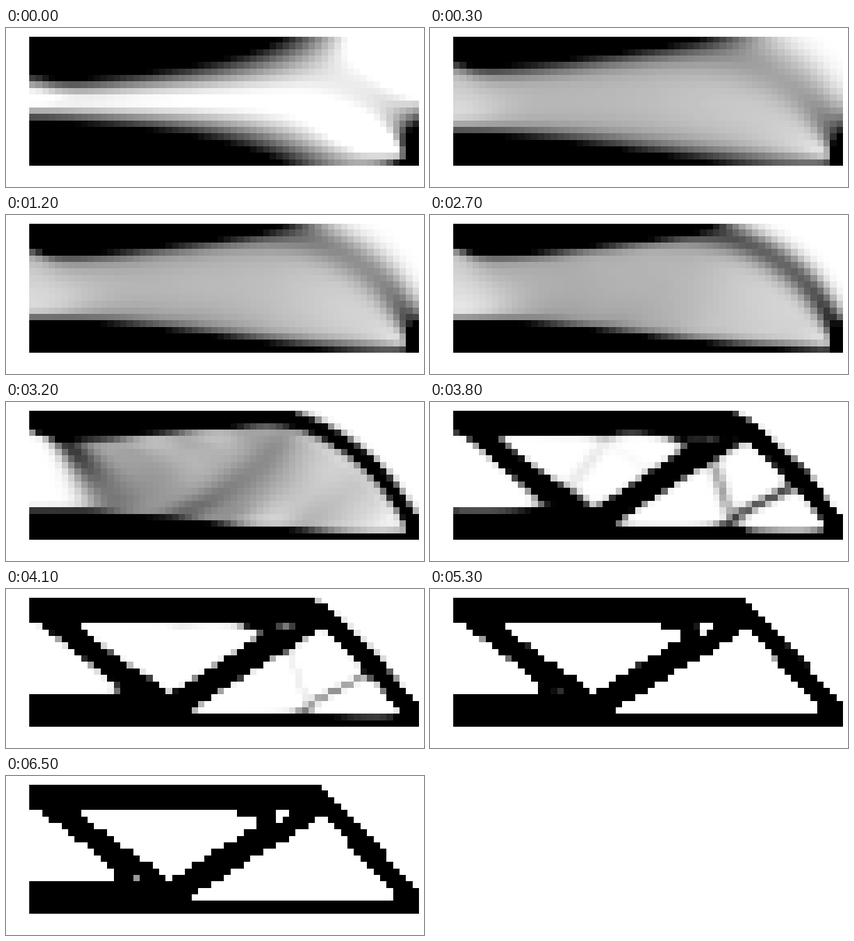
These frames come from a looping animation (666 by 254 pixels, 10000 ms). A matplotlib script:

```python
import numpy as np
import matplotlib.pyplot as plt
from matplotlib.animation import FuncAnimation

W, H, DPI = 666, 254, 100
FRAMES, STEP = 100, 100
NX, NY = 60, 20
CELL, LEFT, RIGHT, TOP, BOTTOM = 10.35, 37, 658, 13, 220
VOLUME, VOID, MOVE, ETA, RADIUS = 0.5, 1e-3, 0.2, 0.5, 1.5
P_HOLD, P_STEP, P_MAX = 25, 0.2, 3  # stiffness penalty
Q_HOLD, Q_STEP, Q_MAX = 24, 0.05, 5  # grey-scale filter
SETTLED = 65
COL = 2 * (NY + 1)  # degrees of freedom in one column of nodes


def element_stiffness(nu=1 / 3):
    """Plane-stress bilinear square, by 2x2 Gauss integration."""
    law = np.array([[1, nu, 0], [nu, 1, 0], [0, 0, (1 - nu) / 2]]) / (1 - nu ** 2)
    sx, sy = np.array([-1, 1, 1, -1]), np.array([-1, -1, 1, 1])
    ke = np.zeros((8, 8))
    for a in (-1, 1):
        for b in (-1, 1):
            dx = sx * (1 + sy * b / 3 ** 0.5) / 2
            dy = sy * (1 + sx * a / 3 ** 0.5) / 2
            strain = np.zeros((3, 8))
            strain[0, ::2] = strain[2, 1::2] = dx
            strain[1, 1::2] = strain[2, ::2] = dy
            ke += strain.T @ law @ strain / 4
    return ke


KE = element_stiffness()
CORNERS = np.array([2, 3, COL + 2, COL + 3, COL, COL + 1, 0, 1])
DOFS = CORNERS + 2 * np.arange(NY)[:, None]


def strain_energy(x, p):
    """Solve the half beam column by column; return unit energies per cell."""
    s = np.zeros((NX, 2 * COL, 2 * COL))
    for r, d in enumerate(DOFS):
        s[:, d[:, None], d] += x[r, :, None, None] ** p * KE
    diag = np.zeros((NX + 1, COL, COL))
    diag[:-1] += s[:, :COL, :COL]
    diag[1:] += s[:, COL:, COL:]
    rollers = np.arange(0, COL, 2)
    diag[0, rollers, rollers] += 1e6
    diag[-1, -1, -1] += 1e6

    carry = [None] * NX
    t = diag[-1]
    for c in reversed(range(NX)):
        link = s[c, :COL, COL:]
        carry[c] = np.linalg.solve(t, link.T)
        t = diag[c] - link @ carry[c]
    load = np.zeros(COL)
    load[1] = -1
    u = [np.linalg.solve(t, load)]
    for g in carry:
        u.append(-g @ u[-1])
    u = np.array(u)
    ue = np.hstack([u[:-1], u[1:]])[:, DOFS]
    return np.einsum("cri,ij,crj->rc", ue, KE, ue)


def smooth(a):
    pad = np.pad(a, 1)
    out = np.zeros_like(a)
    for i in (-1, 0, 1):
        for j in (-1, 0, 1):
            out += (RADIUS - np.hypot(i, j)) * pad[1 + i:1 + i + NY, 1 + j:1 + j + NX]
    return out


WEIGHT = smooth(np.ones((NY, NX)))


def update(x, p, q):
    """One optimality-criteria step; bisection keeps the volume."""
    gain = p * x ** (p - 1) * strain_energy(x, p)
    gain = smooth(x * gain) / (x * WEIGHT)
    lo, hi = 0.0, 1e5
    while (hi - lo) / (hi + lo) > 1e-8 and hi > 1e-40:
        mid = (lo + hi) / 2
        new = (x * (gain / mid) ** ETA) ** q
        new = np.clip(new, np.maximum(VOID, x - MOVE), np.minimum(1, x + MOVE))
        if new.mean() > VOLUME:
            lo = mid
        else:
            hi = mid
    return new


def raised(n, hold, step, top):
    return min(top, 1 + step * max(0, n - hold))


def optimise():
    x = np.full((NY, NX), VOLUME)
    steps = []
    for n in range(SETTLED + 1):
        x = update(x, raised(n, P_HOLD, P_STEP, P_MAX), raised(n, Q_HOLD, Q_STEP, Q_MAX))
        steps.append(x)
    return steps


STEPS = optimise()
COLS = ((np.arange(LEFT, RIGHT) + 0.5 - LEFT) / CELL).astype(int)
ROWS = ((np.arange(TOP + 1, BOTTOM) + 0.5 - TOP) / CELL).astype(int)


def picture(n):
    x = STEPS[min(n, SETTLED)]
    shade = (x.max() - x) / (x.max() - x.min())
    page = np.ones((H, W))
    page[TOP + 1:BOTTOM, LEFT:RIGHT] = shade[np.ix_(ROWS, COLS)]
    return page


fig = plt.figure(figsize=(W / DPI, H / DPI), dpi=DPI, facecolor="white")
ax = fig.add_axes([0, 0, 1, 1])
ax.axis("off")
image = ax.imshow(picture(0), cmap="gray", vmin=0, vmax=1,
                  interpolation="nearest", aspect="auto")


def draw(n):
    image.set_data(picture(n))
    return [image]


anim = FuncAnimation(fig, draw, frames=FRAMES, interval=STEP, repeat=True,
                     repeat_delay=0, blit=False)
plt.show()
```
